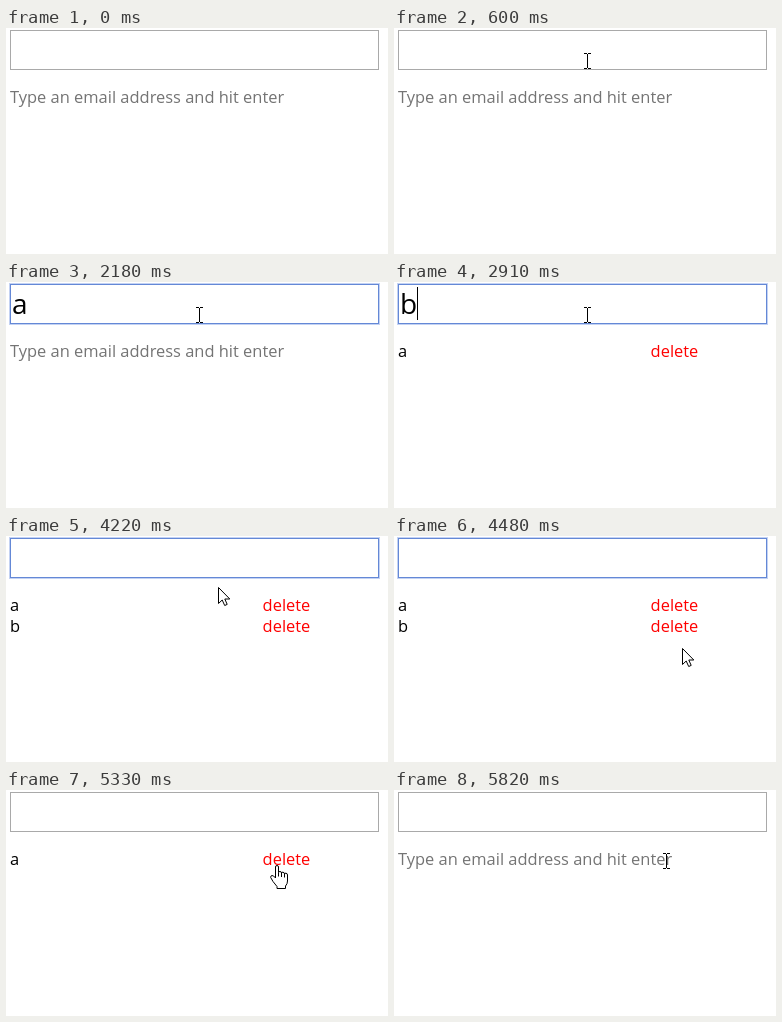
An HTML page with a canvas that plays this animation: 382x226 px, repeating every 5920 ms.

```html
<!DOCTYPE html>
<html lang="en">
<head>
<meta charset="utf-8">
<title>Email list input</title>
<style>
  html, body { margin: 0; width: 100%; height: 100%; overflow: hidden; background: #fff; }
  canvas { display: block; }
</style>
</head>
<body>
<canvas id="stage" width="382" height="226"></canvas>
<script>
const ctx = document.getElementById('stage').getContext('2d');
const LOOP = 5920;
const BLINK = 510;
const ROW_TOP = 59;
const ROW_HEIGHT = 21;
const FOCUS = 680;
const BLUR = 4730;

// Each row is typed, entered into the list and later deleted.
const entries = [
  { name: 'a', typed: 1670, entered: 2240, deleted: 5820 },
  { name: 'b', typed: 2910, entered: 3610, deleted: 4840 },
];

// Pointer moves along Bezier curves and rests in between.
const point = (x, y) => ({ x, y });
const field = point(193, 33);
const link = point(270, 83);
const upperLink = point(270, 72);
const moves = [
  { start: 30, end: 600, path: [point(296, 222), point(227, 96), field, field] },
  { start: 4050, end: 4630, path: [field, point(167, 11), point(350, 178), link] },
  { start: 5230, end: 5380, path: [link, link, upperLink, upperLink] },
  { start: 5800, end: 5820, path: [upperLink, upperLink, point(272, 71), point(272, 71)] },
];

const arrowShape = new Path2D('M.5 .5V16.5L4.2 13L6.7 18.5L9.2 17.4L6.8 12H11.8Z');
const handShape = new Path2D(
  'M-.5 13V2Q-.5 .5 1 .5T2.5 2V7.5Q2.5 6.5 4 6.5T5.5 8Q5.5 7 7 7.2T8.5 9' +
  'Q8.5 8 10 8.2T11.5 10V16Q11.5 19 9.5 21V23.5H1V21.5L-3 16.5L-5.3 12.5' +
  'Q-5.5 10.7 -4 10.5T-.5 13');
const knuckles = new Path2D('M2.5 7.5V11.5M5.5 8V12M8.5 9V12.5');

const between = (t, from, to) => t >= from && t < to;

function bezier(path, axis, k) {
  const [a, b, c, d] = path.map(p => p[axis]);
  const r = 1 - k;
  return Math.round(a * r ** 3 + 3 * b * r * r * k + 3 * c * r * k * k + d * k ** 3);
}

function pointerAt(t) {
  const { start, end, path } = moves.filter(move => move.start <= t).pop();
  const k = Math.min(1, (t - start) / (end - start));
  return point(bezier(path, 'x', k), bezier(path, 'y', k));
}

function text(value, x, y, color, size = 16.46) {
  ctx.font = `${size}px "Open Sans", "Noto Sans", sans-serif`;
  ctx.fillStyle = color;
  ctx.fillText(value, x, y);
}

function box(x, y, w, h, color) {
  ctx.strokeStyle = color;
  ctx.strokeRect(x + .5, y + .5, w, h);
}

function drawInput(t) {
  const focused = between(t, FOCUS, BLUR);
  if (focused) box(3, 1, 370, 41, '#c3d2f3');
  box(4, 2, 368, 39, focused ? '#6488d6' : '#a9a9a9');

  const entry = entries.find(e => between(t, e.typed, e.entered));
  if (entry) text(entry.name, 6, 32, '#000', 28);

  // The caret starts visible again after every focus or edit.
  const edits = [FOCUS, ...entries.flatMap(e => [e.typed, e.entered])];
  const lastEdit = Math.max(...edits.filter(time => time <= t));
  if (focused && Math.floor((t - lastEdit) / BLINK) % 2 === 0) {
    ctx.fillStyle = '#000';
    ctx.fillRect(entry ? 23 : 6, entry ? 5 : 6, 1, 33);
  }
}

function drawList(rows) {
  if (!rows.length) text('Type an email address and hit enter', 4, 75, '#747474');
  rows.forEach((row, i) => {
    const baseline = 75 + ROW_HEIGHT * i;
    text(row.name, 4, baseline, '#000');
    text('delete', 256.6, baseline, '#f00');
  });
}

function drawTextCursor() {
  ctx.fillStyle = '#000';
  for (const end of [-8, 7]) {
    ctx.fillRect(-3, end, 3, 1);
    ctx.fillRect(1, end, 3, 1);
  }
  ctx.fillRect(0, -7, 1, 14);
}

function drawOutlined(shape) {
  ctx.fillStyle = '#fff';
  ctx.strokeStyle = '#000';
  ctx.fill(shape);
  ctx.stroke(shape);
}

function drawPointer(t, rows) {
  const { x, y } = pointerAt(t);
  const overHint = !rows.length && between(y, ROW_TOP, ROW_TOP + ROW_HEIGHT) && x < 279;
  const overLink = between(x, 256, 305) && between(y, ROW_TOP, ROW_TOP + ROW_HEIGHT * rows.length);

  ctx.save();
  ctx.translate(x, y);
  if (y < 42 || overHint) {
    drawTextCursor();
  } else if (overLink) {
    drawOutlined(handShape);
    ctx.stroke(knuckles);
  } else {
    drawOutlined(arrowShape);
  }
  ctx.restore();
}

function draw(t) {
  const rows = entries.filter(e => between(t, e.entered, e.deleted));
  ctx.fillStyle = '#fff';
  ctx.fillRect(0, 0, 382, 226);
  drawInput(t);
  drawList(rows);
  if (t >= moves[0].start) drawPointer(t, rows);
}

const start = performance.now();
function tick() {
  draw((performance.now() - start) % LOOP);
  requestAnimationFrame(tick);
}
tick();
</script>
</body>
</html>
```
